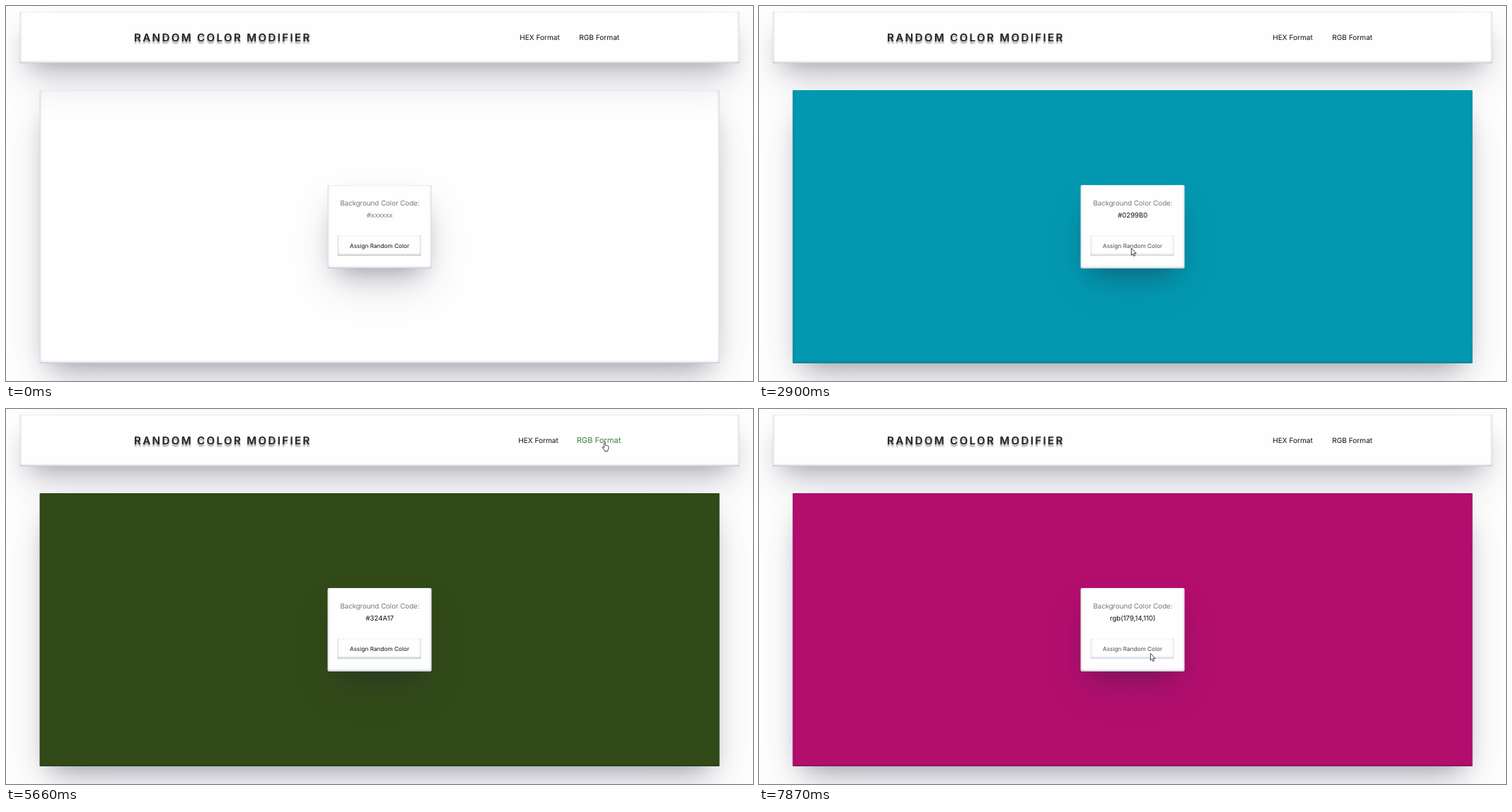
Recreate the animation shown at these times as an HTML page. Size 1056 by 530 pixels, loop 8000 ms.

```html
<!DOCTYPE html>
<html lang="en">
<head>
<meta charset="utf-8">
<title>Random Color Modifier</title>
<style>
  html, body { margin: 0; width: 100%; height: 100%; overflow: hidden; }
  body {
    position: relative;
    background: #fefefe;
    color: #111;
    font-family: Inter, "Open Sans", sans-serif;
    text-rendering: geometricPrecision;
  }
  .box, .text, #cursor, #click { position: absolute; }
  .box {
    box-sizing: border-box;
    border-radius: 1px;
    transform: translateX(-.4px);
    box-shadow:
      rgba(50, 50, 93, .25) 0 27.5px 55px -11px,
      rgba(0, 0, 0, .3) 0 16.5px 33px -16.5px,
      rgba(10, 37, 64, .35) 0 -1.1px 3.3px inset;
  }
  .text { white-space: nowrap; line-height: 1; transform: translate(-50%, -50%); }

  #header { left: 20px; top: 8px; width: 1017px; height: 73px; background: #fefefe; }
  #panel { left: 48px; top: 119px; width: 961px; height: 386px; }
  #card { left: 455px; top: 253px; width: 147px; height: 118px; border-radius: 2px; background: #fefefe; }
  #button {
    left: 469px; top: 324px; width: 118px; height: 29px;
    background: #fefefe;
    box-shadow: rgba(10, 37, 64, .35) 0 -1.3px 3.3px inset;
  }

  #title {
    left: 181px; top: 45px;
    transform: translateY(-50%);
    font-size: 15.2px; font-weight: 600; letter-spacing: 2.3px;
    color: #222;
    text-shadow: 0 3px 2px rgba(40, 50, 60, .5);
  }
  #hex, #rgb { top: 44.5px; font-size: 10.1px; }
  #rgb { left: 838.7px; }
  #caption { left: 528.5px; top: 280.3px; font-size: 9.8px; font-weight: 300; color: #555; }
  #code { left: 528.3px; top: 297.3px; font-size: 9.6px; }
  #action { left: 59.4px; top: 14.8px; font-size: 8.25px; }

  #click {
    left: -7.2px; top: -7.7px; width: 14.4px; height: 14.4px;
    border-radius: 50%;
    background: #fbf23c;
    mix-blend-mode: multiply;
  }
  #cursor { left: 0; top: 0; overflow: visible; }
  #cursor path { fill: #fff; stroke: #222; stroke-width: .85; stroke-linejoin: round; }
</style>
</head>
<body>
  <div id="header" class="box"></div>
  <div id="title" class="text">RANDOM COLOR MODIFIER</div>
  <div id="hex" class="text">HEX Format</div>
  <div id="rgb" class="text">RGB Format</div>

  <div id="panel" class="box"></div>
  <div id="card" class="box"></div>
  <div id="caption" class="text">Background Color Code:</div>
  <div id="code" class="text"></div>
  <div id="button" class="box"><span id="action" class="text">Assign Random Color</span></div>

  <div id="click"></div>
  <svg id="cursor" width="12" height="16">
    <path id="arrow" d="M.4 .4V10.2L2.6 8.2L4 11.6L5.6 10.9L4.2 7.6H7.3Z"/>
    <path id="hand" transform="translate(-3.2 0)"
      d="M3.2 8V1.3a1 1 0 0 1 2 0V5l3.3.7q1.4.4 1.2 1.8L9.2 10.5q-.2.9-.8 1.6v1.4H4v-1.2L.8 8.6q-.5-.9.4-1.3.8-.2 2 1.2Z"/>
  </svg>

<script>
const LOOP = 8000;
const STEP = 67;
const $ = id => document.getElementById(id);

// The click mark shows from down to up; the code applies from up on.
const phases = [
  { down: 0, up: 0, code: '#xxxxxx' },
  { down: 2100, up: 2320, code: '#6C8A5E' },
  { down: 2700, up: 2900, code: '#0299B0' },
  { down: 3360, up: 3510, code: '#F70082' },
  { down: 4170, up: 4380, code: '#324A17' },
  { down: 5520, up: 5660, code: '#324A17' },
  { down: 5800, up: 5800, code: 'rgb(x,x,x)' },
  { down: 6990, up: 7210, code: 'rgb(96,128,142)' },
  { down: 7670, up: 7870, code: 'rgb(179,14,110)' }
];

// Each stop is reached from the one before; lift raises the path's middle.
const stops = [
  { at: 0, x: 1042, y: 536 },
  { at: 190, x: 866, y: 240 },
  { at: 1000, x: 526, y: 344, lift: 85 },
  { at: 1960, x: 526, y: 342 },
  { at: 4380, x: 842, y: 57 },
  { at: 5250, x: 845.5, y: 46.2 },
  { at: 6060, x: 553, y: 345 }
];

const clamp = v => Math.min(1, Math.max(0, v));
const ease = u => u * u * (3 - 2 * u);

function pointer(t) {
  const i = stops.findLastIndex(s => t >= s.at);
  const to = stops[i], from = stops[i - 1] || to;
  const far = Math.hypot(to.x - from.x, to.y - from.y) > 50;
  const steps = Math.floor((t - to.at) / STEP) + 1;
  const u = ease(clamp(steps / (far ? 12 : 3)));
  const rise = 2 * u * (1 - u) * (to.lift || 0);
  return [from.x + (to.x - from.x) * u, from.y + (to.y - from.y) * u - rise];
}

const show = (el, on) => { el.style.visibility = on ? 'visible' : 'hidden'; };

function drawNav(t) {
  const p = clamp((t - 5200) / 270) - clamp((t - 6010) / 270);
  $('hex').style.left = 754.5 - 2 * p + 'px';
  $('rgb').style.transform = `translate(-50%, -50%) translateX(${-p}px) scale(${1 + .1 * p})`;
  $('rgb').style.color = `color-mix(in srgb, #3a843a ${100 * p}%, #111)`;
}

function drawCode(t) {
  const { code } = phases.findLast(p => t >= p.up);
  const blank = code.includes('x');
  $('panel').style.background = blank ? 'transparent' : code;
  $('code').textContent = code;
  $('code').style.color = blank ? '#555' : '#111';
  $('code').style.fontWeight = blank ? 300 : 400;
}

function drawPointer(t) {
  const [x, y] = pointer(t);
  const over = x > 469 && x < 587 && y > 324 && y < 353;
  const hand = Math.abs(x - 838) < 30 && y < 54;
  $('button').style.opacity = over ? .75 : 1;
  $('cursor').style.transform = $('click').style.transform = `translate(${x}px, ${y}px)`;
  show($('arrow'), !hand);
  show($('hand'), hand);
  show($('click'), phases.some(p => t >= p.down && t < p.up));
}

const start = performance.now();
function tick() {
  const t = (performance.now() - start) % LOOP;
  drawNav(t);
  drawCode(t);
  drawPointer(t);
  requestAnimationFrame(tick);
}
tick();
</script>
</body>
</html>
```
